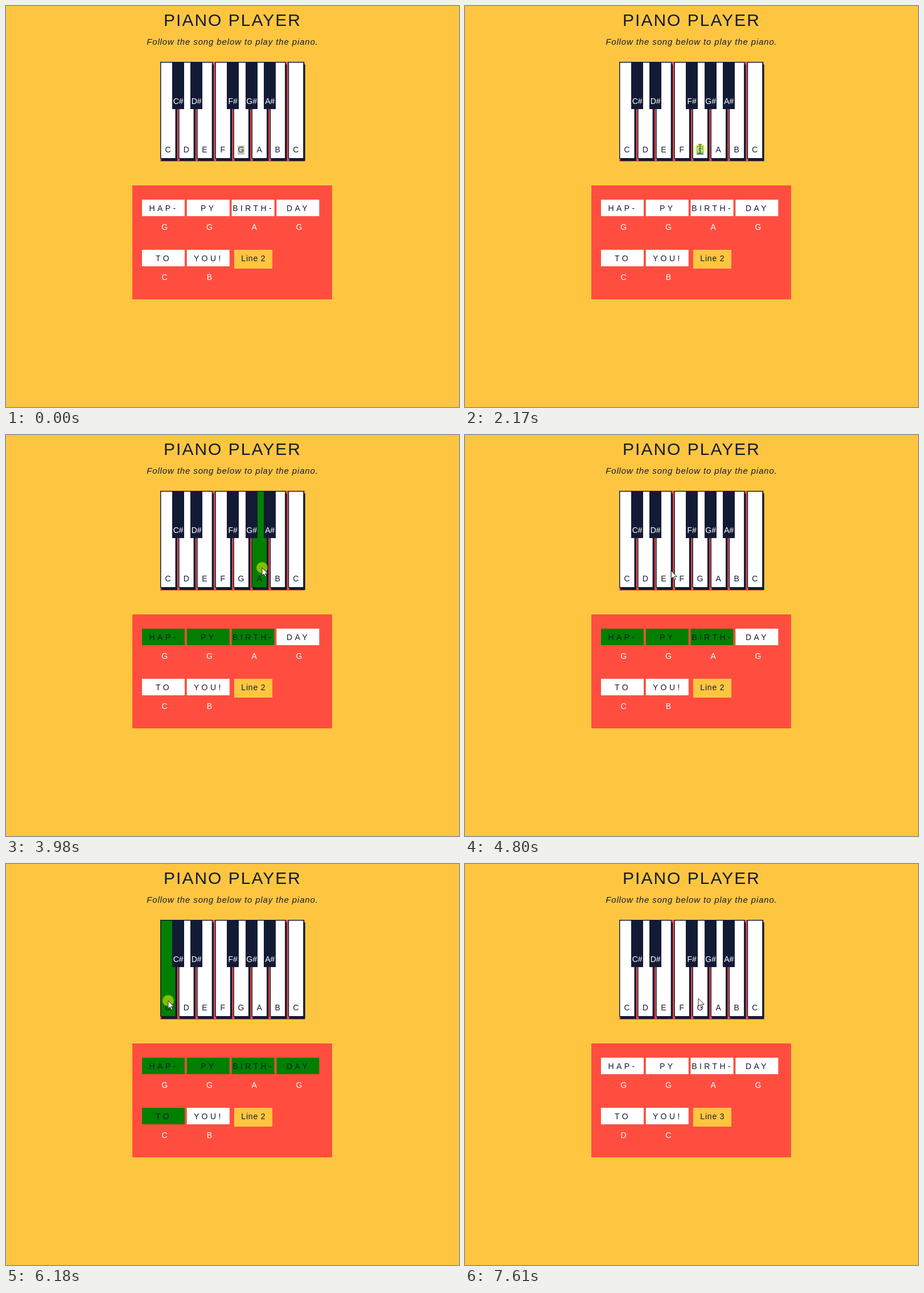
These frames come from a looping animation (796 px wide and 704 px high, 8 s). An HTML page:

```html
<!DOCTYPE html>
<html lang="en">
<head>
<meta charset="utf-8">
<title>Piano player</title>
<style>
  html, body { margin: 0; width: 100%; height: 100%; overflow: hidden; background: #fec640; }
  svg { display: block; width: 796px; height: 704px; }
  text { font: 14px "Liberation Sans", Arial, sans-serif; fill: #131a35; text-anchor: middle; }
  .title { font-size: 30px; letter-spacing: 2px; }
  .intro { font-size: 15px; font-style: italic; letter-spacing: .87px; }
  .word { letter-spacing: 4.4px; }
  .button { letter-spacing: .8px; }
  .light { fill: #fff; }
</style>
</head>
<body>
<svg id="stage" viewBox="0 0 796 704"></svg>
<script>
const NAVY = '#131a35', RED = '#ff4e40', YELLOW = '#fec640', GREEN = '#008000';
const stage = document.getElementById('stage');

function add(tag, attrs, content = '') {
  const el = document.createElementNS('http://www.w3.org/2000/svg', tag);
  for (const name in attrs) el.setAttribute(name, attrs[name]);
  el.textContent = content;
  return stage.appendChild(el);
}
const rect = (x, y, width, height, fill) => add('rect', { x, y, width, height, fill });
const label = (content, x, y, cls = '') => add('text', { x, y, class: cls }, content);
const show = (el, on) => el.setAttribute('visibility', on ? 'visible' : 'hidden');

label('PIANO PLAYER', 398, 35, 'title');
label('Follow the song below to play the piano.', 398, 68, 'intro');

// Piano
rect(271, 98, 254, 175, RED);
const keys = [...'CDEFGABC'].map((note, i) => {
  const x = 271 + 32.1 * i;
  rect(x + 2, 102.5, 28, 169.5, NAVY);
  rect(x, 98, 28, 170, NAVY);
  return rect(x + 1.5, 99.5, 25, 167.5, '#fff');
});
const selection = rect(407, 245, 12, 16, '#c8c8c4');
const keyLabels = [...'CDEFGABC'].map((note, i) => label(note, 284.6 + 32.1 * i, 257));
[['C#', 292], ['D#', 324], ['F#', 388], ['G#', 421], ['A#', 453]].forEach(([note, x]) => {
  rect(x, 98, 21, 83, NAVY);
  label(note, x + 10.7, 172, 'light');
});

// Song sheet
rect(222, 315, 351, 200, RED);
const notes = [];
const words = ['HAP-', 'PY', 'BIRTH-', 'DAY', 'TO', 'YOU!'].map((word, i) => {
  const x = 239 + 78.8 * (i % 4), y = i < 4 ? 340 : 428;
  const box = rect(x, y, 75, 29, '#fff');
  label(word, x + 38, y + 20, 'word');
  notes.push(label('', x + 39.6, y + 53, 'light'));
  return box;
});
rect(401, 428, 67, 33, YELLOW);
const button = label('', 434.8, 448, 'button');

// Pointer
const spot = add('circle', { r: 10, fill: '#ff0', 'fill-opacity': .5 });
const arrow = add('path', {
  d: 'M0 0V14L3.3 11L5.6 16.3L7.9 15.3L5.6 10.4H10Z',
  fill: '#fff', stroke: '#111', 'stroke-width': .9
});
const beam = add('path', { d: 'M-3 -8H3M0 -8V8M-3 8H3', stroke: '#222', fill: 'none' });

// Waypoints: time, x, y
const path = [
  [320, 737, 698], [880, 317, 168], [1070, 348, 189], [1140, 348, 189], [1760, 413, 251],
  [2550, 413, 251], [2680, 410, 227], [3360, 410, 227], [3800, 450, 233], [4240, 450, 233],
  [4620, 321, 240], [5000, 410, 236], [5490, 410, 236], [5990, 285, 240], [6300, 285, 240],
  [6570, 488, 241], [6720, 478, 238], [7130, 478, 238], [7610, 410, 236]
];
// Clicks: spot on, word lit, spot off, key released, key index (-1: key stays white)
const clicks = [
  [2060, 2230, 2290, 2290, -1],
  [2690, 2760, 2890, 2960, 4],
  [3850, 3910, 4050, 4110, 5],
  [5070, 5140, 5280, 5350, 4],
  [6050, 6120, 6250, 6320, 0],
  [6790, 6860, 7000, 7060, 6]
];
const RESET = 7200;

function pointerAt(t) {
  const next = path.findIndex(p => p[0] > t);
  if (next < 1) return path[next < 0 ? path.length - 1 : 0].slice(1);
  const [t0, x0, y0] = path[next - 1], [t1, x1, y1] = path[next];
  const u = (t - t0) / (t1 - t0), k = u * u * (3 - 2 * u);
  return [x0 + (x1 - x0) * k, y0 + (y1 - y0) * k];
}

function draw(t) {
  const done = t >= RESET;
  const [x, y] = pointerAt(t);
  keys.forEach((key, i) => {
    const down = clicks.some(c => c[4] === i && t >= c[1] && t < c[3]);
    key.setAttribute('fill', down ? GREEN : '#fff');
  });
  words.forEach((box, i) => {
    box.setAttribute('fill', !done && t >= clicks[i][1] ? GREEN : '#fff');
    notes[i].textContent = (done ? 'GGAGDC' : 'GGAGCB')[i];
  });
  button.textContent = done ? 'Line 3' : 'Line 2';

  const focused = t >= clicks[0][0], selected = t < clicks[0][1];
  show(selection, selected);
  selection.setAttribute('fill', focused ? '#0078d7' : '#c8c8c4');
  keyLabels[4].style.fill = !selected ? NAVY : focused ? '#fff' : '#444';

  const overText = t >= 1650 && t < 2560;
  for (const el of [spot, arrow, beam]) el.setAttribute('transform', `translate(${x} ${y})`);
  show(spot, clicks.some(c => t >= c[0] && t < c[2]));
  show(arrow, t >= 320 && !overText);
  show(beam, overText);
}

const start = performance.now();
function tick() {
  draw((performance.now() - start) % 8000);
  requestAnimationFrame(tick);
}
tick();
</script>
</body>
</html>
```
